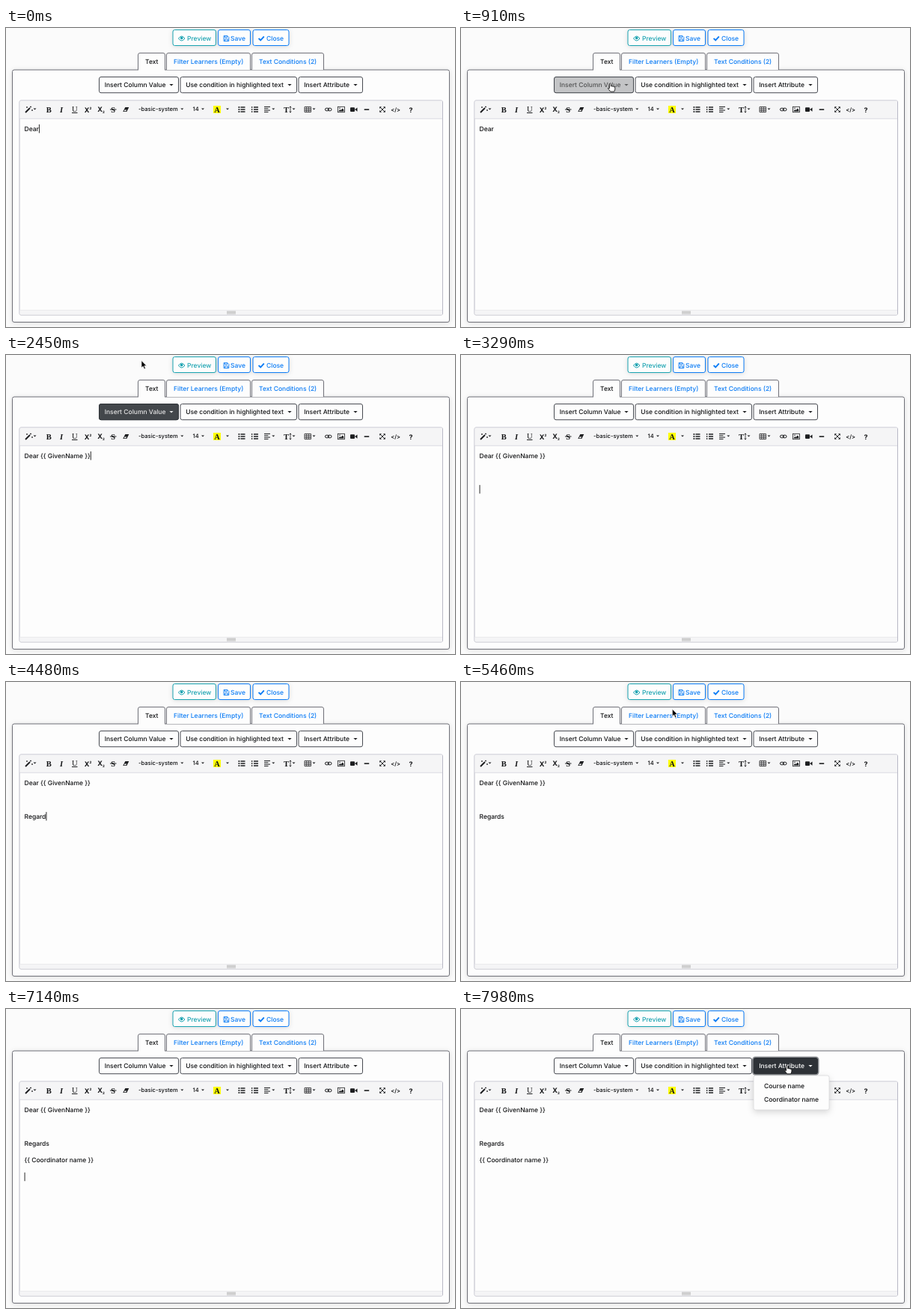
Write an HTML page that moves like this. It is 600 by 400 pixels and loops after 8000 ms.

```html
<!DOCTYPE html>
<html lang="en">
<head>
<meta charset="utf-8">
<title>Message editor</title>
<style>
html, body { margin: 0; width: 100%; height: 100%; overflow: hidden; background: #fbfbfb; }
svg { display: block; width: 100%; height: 100%; }
text { font: 500 8.5px Inter, "Open Sans", sans-serif; fill: #111214; white-space: pre; text-rendering: geometricPrecision; }
.serif { font: bold 10.5px "Liberation Serif", "Noto Serif", serif; }
.bold { font-weight: 700; font-size: 9px; }
.small { font-size: 7.6px; }
.tiny { font-size: 4.5px; font-weight: 700; }
.line { fill: none; stroke: #1d1e20; stroke-width: 1; }
.fine { stroke-width: .8; }
.ink { fill: #1d1e20; }
.glow { filter: drop-shadow(0 1px 3px rgba(0, 0, 0, .13)); }
.menu { filter: drop-shadow(0 3px 4px rgba(0, 0, 0, .15)); }
.dark text { fill: #fff; }
.dark .ink { fill: #fff; }
</style>
</head>
<body>
<svg id="stage" viewBox="0 0 600 400" xmlns="http://www.w3.org/2000/svg"></svg>
<script>
const LOOP = 8000, EDGE = '#6f7078', OUTLINE = '#484b52', DARK = '#2e3237';
const PAGE = '#fbfbfb', PAPER = '#fdfdfd', BAR = '#f5f5f6', BLUE = '#0a7bf5', TEAL = '#17a2b0';

const text = (x, y, s, attrs = '') => `<text x="${x}" y="${y}" ${attrs}>${s}</text>`;
const box = (x, y, w, h, attrs = '') => `<rect x="${x}" y="${y}" width="${w}" height="${h}" ${attrs}/>`;
const path = (d, attrs = 'class="line"') => `<path d="${d}" ${attrs}/>`;
const arrow = (x, y, r = 2.6) => path(`M${x - r} ${y}h${2 * r}l${-r} ${r}z`, 'class="ink"');
const rows = (x, y, w, n, gap) => Array.from({ length: n }, (_, i) => `M${x} ${y + i * gap}h${w}`).join('');

// Top row
function action(x, w, label, textX, color, icon) {
  return box(x, 2.5, w, 21, `rx="2.5" fill="${PAPER}" stroke="${color}" class="glow"`) +
    icon + text(textX, 16.8, label, `style="fill:${color}"`);
}
const eye = path('M230.5 14q4.2-6 8.4 0q-4.2 6-8.4 0z', `fill="none" stroke="${TEAL}"`) +
  `<circle cx="234.7" cy="13.5" r="1.8" fill="${TEAL}"/>`;
const disk = path('M291 10.5h5l1.8 1.8v5.2h-6.8zM292.5 10.5v2.3h3v-2.3M292.5 17.5v-2.6h3.8v2.6',
  `fill="none" stroke="${BLUE}" stroke-width=".9"`);
const check = path('M337.6 13.8l2.6 2.6l4.6-5', `fill="none" stroke="${BLUE}" stroke-width="1.9"`);
const actions = action(223, 57.5, 'Preview', 242, TEAL, eye) +
  action(283.5, 43, 'Save', 300, BLUE, disk) +
  action(330, 48, 'Close', 348, BLUE, check);

// Tabs and panel
function tab(x, w, label, textX, active) {
  const d = `M${x} 56v-20q0-2.5 2.5-2.5h${w - 5}q2.5 0 2.5 2.5v20`;
  const cover = active ? box(x + .5, 55, w - 1, 2, `fill="${PAPER}"`) : '';
  return path(d, `fill="${PAPER}" stroke="${EDGE}"`) + cover +
    text(textX, 48, label, active ? '' : `style="fill:${BLUE}"`);
}
const panel = box(8.5, 56, 584, 337.5, `rx="2.5" fill="${PAPER}" stroke="${EDGE}" class="glow"`) +
  tab(176.5, 36, 'Text', 186, true) +
  tab(214.5, 112, 'Filter Learners (Empty)', 224) +
  tab(328.5, 96, 'Text Conditions (2)', 338);

// Dropdown buttons
const buttons = [
  { x: 124.5, w: 106, label: 'Insert Column Value' },
  { x: 233, w: 155.5, label: 'Use condition in highlighted text' },
  { x: 391, w: 85.5, label: 'Insert Attribute' }
];
function dropdown({ x, w, label }, fill) {
  return box(x, 65.5, w, 21.2, `rx="2.5" fill="${fill}" stroke="${fill === DARK ? DARK : OUTLINE}"`) +
    text(x + 7.2, 79.4, label) + arrow(x + w - 9.5, 75);
}
const darkButton = (b, id) => `<g id="dark${id}" class="dark">` +
  box(b.x - 1, 64.5, b.w + 2, 23.2, `id="ring${id}" rx="3.5" fill="none" stroke="#8f9296" stroke-width="2"`) +
  dropdown(b, DARK) + '</g>';

// Toolbar
const Y = 109;
const wand = path(`M26 ${Y + 4}l6-6`, 'class="line" style="stroke-width:1.9"') +
  path(`M33 ${Y - 4.5}v2M32 ${Y - 3.5}h2M28 ${Y - 4}v2M27 ${Y - 3}h2M35 ${Y}v2M34 ${Y + 1}h2`, 'class="line fine"');
const eraser = path(`M156.3 ${Y + 3}l3-6h5l-3 6z`, 'class="ink"') +
  path(`M157.7 ${Y + 2.2}l.8-1.6h2.6l-.8 1.6z`, `fill="${PAPER}"`);
const list = (x, mark) => [-3, 0, 3].map(d => box(x, Y + d - .9, mark, 1.8, 'class="ink"')).join('') +
  path(rows(x + 3, Y - 3, 6, 3, 3), 'class="line" style="stroke-width:1.3"');
const align = path(`M345 ${Y - 3.5}h8M345 ${Y - 1.2}h5.5M345 ${Y + 1.1}h8M345 ${Y + 3.4}h5.5`);
const height = text(371, Y + 3.5, 'T', 'class="serif"') +
  path(`M380 ${Y - 4}v8M378.8 ${Y - 2.5}l1.2-1.7l1.2 1.7M378.8 ${Y + 2.5}l1.2 1.7l1.2-1.7`, 'class="line fine"');
const grid = path(`M399 ${Y - 3.5}h8.5v7h-8.5zM399 ${Y - 1}h8.5M399 ${Y + 1.3}h8.5M401.8 ${Y - 3.5}v7M404.7 ${Y - 3.5}v7`, 'class="line fine"');
const link = box(426.5, Y - 1.8, 5, 3.6, 'rx="1.8" class="line"') + box(430, Y - 1.8, 5, 3.6, 'rx="1.8" class="line"');
const picture = box(443.5, Y - 3.7, 9, 7.4, 'class="line fine"') +
  path(`M444.8 ${Y + 2.5}v-1l1.6-1.6l1.2 1l2.2-2.3l1.5 1.8v2.1z`, 'class="ink"') +
  `<circle cx="446" cy="${Y - 1.8}" r=".8" class="ink"/>`;
const video = box(460, Y - 2.7, 6, 5.6, 'rx="1" class="ink"') + path(`M466 ${Y}l3.5-2.6v5.3z`, 'class="ink"');
const expand = path(`M500 ${Y - 3}l6 6M506 ${Y - 3}l-6 6`) +
  [[-1, -1], [1, -1], [-1, 1], [1, 1]].map(([a, b]) =>
    path(`M${503 + a * 3.8} ${Y + b * 3.8}h${-a * 2.8}l${a * 2.8} ${-b * 2.8}z`, 'class="ink"')).join('');
const toolbar = wand + arrow(38.5, 107.5, 2) +
  text(53.7, 112.5, 'B', 'class="serif"') +
  text(72, 112.5, 'I', 'class="serif" style="font-style:italic"') +
  text(88, 112, 'U', 'class="serif" style="font-weight:400"') + path('M88 113.5h7.5') +
  text(104.8, 112.5, 'X', 'class="bold"') + text(111.4, 109, '2', 'class="tiny"') +
  text(122.3, 112, 'X', 'class="bold"') + text(128.9, 114, '2', 'class="tiny"') +
  text(140.3, 112.5, 'S', 'class="serif"') + path(`M139 ${Y}h8.5`) +
  eraser +
  text(177, 111.4, '-basic-system', 'class="small"') + arrow(235.3, 107.5, 2) +
  text(249.5, 111.4, '14', 'class="small"') + arrow(263, 107.5, 2) +
  box(277, 104, 10, 10, 'fill="#ffff00"') + text(278.2, 112.5, 'A', 'class="serif"') + arrow(296, 107.5, 2) +
  list(310.5, 1.8) + list(328, 1.3) + align + arrow(357.3, 107.5, 2) +
  height + arrow(384.5, 107.5, 2) + grid + arrow(411.5, 107.5, 2) +
  link + picture + video + box(478.7, Y - .7, 6.5, 1.6, 'class="ink"') + expand +
  text(514.3, 111.6, '&lt;/&gt;', 'style="font-size:7.4px;font-weight:600"') +
  text(538.4, 112.6, '?', 'class="bold"');

const editor = box(18, 97, 565.5, 287, `rx="2" fill="${PAPER}" stroke="#b9b9c6"`) +
  box(18.5, 97.5, 564.5, 23.5, `fill="${BAR}"`) + path('M18 121.3h565', 'stroke="#d3d3dc" stroke-width=".8"') +
  box(18.5, 377.5, 564.5, 6, `fill="${BAR}"`) + path('M18 377.5h565', 'stroke="#e4e4e8" stroke-width=".7"') +
  path(rows(295, 379.2, 12, 3, 1.5), 'stroke="#b0b0b0" stroke-width=".8"') + toolbar;

// Menus
const STEP = 18;
const columns = ['GivenName', 'MiddleInitial', 'Gender', 'UOS Code', 'Program', 'Enrolment Type',
  'Attendance', 'Difficult Week 1', 'Sat W1',
  ...Array.from({ length: 10 }, (_, i) => 'Q' + String(i + 1).padStart(2, '0')),
  'Total', 'Days online 2', 'Views 2', 'Contributions 2'];
const menus = [
  { x: 125, y: -30, w: 93, h: 460, first: 5, items: columns },
  { x: 391, y: 89, w: 101, h: 46, first: 103, items: ['Course name', 'Coordinator name'] }
];
const menu = (m, id) => `<g id="menu${id}">` +
  box(m.x, m.y, m.w, m.h, `rx="2.5" fill="${PAPER}" stroke="#d4d4d6" stroke-width=".7" class="menu"`) +
  box(m.x + .5, 0, m.w - 1, STEP, `id="hover${id}" fill="#f6f7f8"`) +
  m.items.map((s, i) => text(m.x + 14, m.first + i * STEP + 3.1, s)).join('') + '</g>';

const LINE_Y = [138, 160.4, 182.9, 205.3, 227.7];
const pointer = path('M0 0v9.6l2.2-2l1.6 3.7l1.6-.7l-1.6-3.6h3z', 'id="pointer" fill="#000" stroke="#fff" stroke-width=".6"');
const hand = path('M0 1q1-1.6 2 0v3.2q1.2-.8 1.9.3q1.2-.7 1.8.4q1.7-.5 1.7 1.2v2.2l-1.1 3h-5l-3.2-4q-.5-1.8 1.9-.3z',
  'id="hand" fill="#fff" stroke="#000" stroke-width=".8"');

const $ = id => document.getElementById(id);
$('stage').innerHTML = box(0, 0, 600, 400, `fill="${PAGE}"`) + actions + panel +
  buttons.map(b => dropdown(b, PAPER)).join('') +
  darkButton(buttons[0], 0) + darkButton(buttons[2], 1) + editor +
  LINE_Y.map((y, i) => text(24.5, y, '', `id="line${i}"`)).join('') +
  box(0, 0, .9, 11.5, 'id="caret" fill="#111"') +
  menus.map(menu).join('') + pointer + hand;

// Timeline, in ms
const SPACE = 140, OPEN1 = 1120, PICK1 = 2400, ENTER1 = 3010, ENTER2 = 3220, TYPE = 3710, KEY = 140;
const ENTER3 = 4900, OPEN2 = 5830, PICK2 = 6440, ENTER4 = 6930, OPEN3 = 7740;
const SIGN = 'Regards';
const keys = [0, SPACE, PICK1, ENTER1, ENTER2, ...Array.from(SIGN, (_, i) => TYPE + i * KEY), ENTER3, PICK2, ENTER4];
const moves = [
  { from: 560, to: 2800, points: [[560, 208, 138], [960, 198, 71], [1540, 197, 69.5], [1760, 197, 69.5], [2240, 181, 7.5]] },
  { from: 5230, to: ENTER4, points: [[5230, 181, 7.5], [5740, 417, 74.5], [5950, 417, 74.5], [6300, 432, 119]] },
  { from: 7420, to: LOOP, points: [[7420, 432, 119], [7700, 434.5, 75.5]] }
];

const clamp = v => Math.max(0, Math.min(1, v));
const within = (t, a, b) => t >= a && t < b;
const pulse = (t, a, b, d = 150) => Math.min(clamp((t - a) / d), clamp((b + d - t) / d));
const show = (id, on) => $(id).setAttribute('visibility', on ? 'visible' : 'hidden');

function along(points, t) {
  let i = 0;
  while (i < points.length - 1 && t >= points[i + 1][0]) i++;
  const [t0, x0, y0] = points[i], [t1, x1, y1] = points[i + 1] || points[i];
  const p = t1 > t0 ? clamp((t - t0) / (t1 - t0)) : 0, e = p * p * (3 - 2 * p);
  return [x0 + (x1 - x0) * e, y0 + (y1 - y0) * e];
}

function drawText(t) {
  const lines = [
    'Dear' + (t >= SPACE ? ' ' : '') + (t >= PICK1 ? '{{ GivenName }}' : ''),
    '',
    SIGN.slice(0, Math.max(0, Math.floor((t - TYPE) / KEY) + 1)),
    t >= PICK2 ? '{{ Coordinator name }}' : '',
    ''
  ];
  lines.forEach((s, i) => { $('line' + i).textContent = s; });
  const row = [ENTER1, ENTER2, ENTER3, ENTER4].filter(k => t >= k).length;
  const last = Math.max(...keys.filter(k => k <= t));
  const focused = t < OPEN1 || within(t, PICK1, OPEN2) || within(t, PICK2, OPEN3);
  show('caret', focused && (t - last) % 1000 < 500);
  $('caret').setAttribute('x', 24.6 + (lines[row] ? $('line' + row).getComputedTextLength() : 0));
  $('caret').setAttribute('y', LINE_Y[row] - 9);
}

function drawMenus(t, x, y, active) {
  const open = [within(t, OPEN1, PICK1), within(t, OPEN2, PICK2) || t >= OPEN3];
  menus.forEach((m, i) => {
    const n = Math.floor((y - m.first + STEP / 2) / STEP);
    show('menu' + i, open[i]);
    show('hover' + i, open[i] && active && x > m.x && x < m.x + m.w && n >= 0 && n < m.items.length);
    $('hover' + i).setAttribute('y', m.first - STEP / 2 + n * STEP);
  });
  $('dark0').setAttribute('opacity', pulse(t, 870, PICK1 + 35));
  $('ring0').setAttribute('opacity', pulse(t, OPEN1, PICK1 - 150));
  $('dark1').setAttribute('opacity', Math.max(pulse(t, 5640, PICK2), pulse(t, 7590, LOOP)));
  $('ring1').setAttribute('opacity', Math.max(pulse(t, OPEN2 + 50, PICK2), pulse(t, OPEN3 + 50, LOOP)));
  return open;
}

function draw(t) {
  const move = moves.find(m => within(t, m.from, m.to));
  const [x, y] = move ? along(move.points, t) : [0, 0];
  const open = drawMenus(t, x, y, !!move);
  const overButton = y > 65 && y < 87 && buttons.some(b => x > b.x && x < b.x + b.w) && !open[0];
  for (const id of ['pointer', 'hand']) {
    show(id, move && (id === 'hand') === overButton);
    $(id).setAttribute('transform', `translate(${x} ${y})`);
  }
  drawText(t);
}

const start = performance.now();
function tick() {
  draw((performance.now() - start) % LOOP);
  requestAnimationFrame(tick);
}
tick();
</script>
</body>
</html>
```
